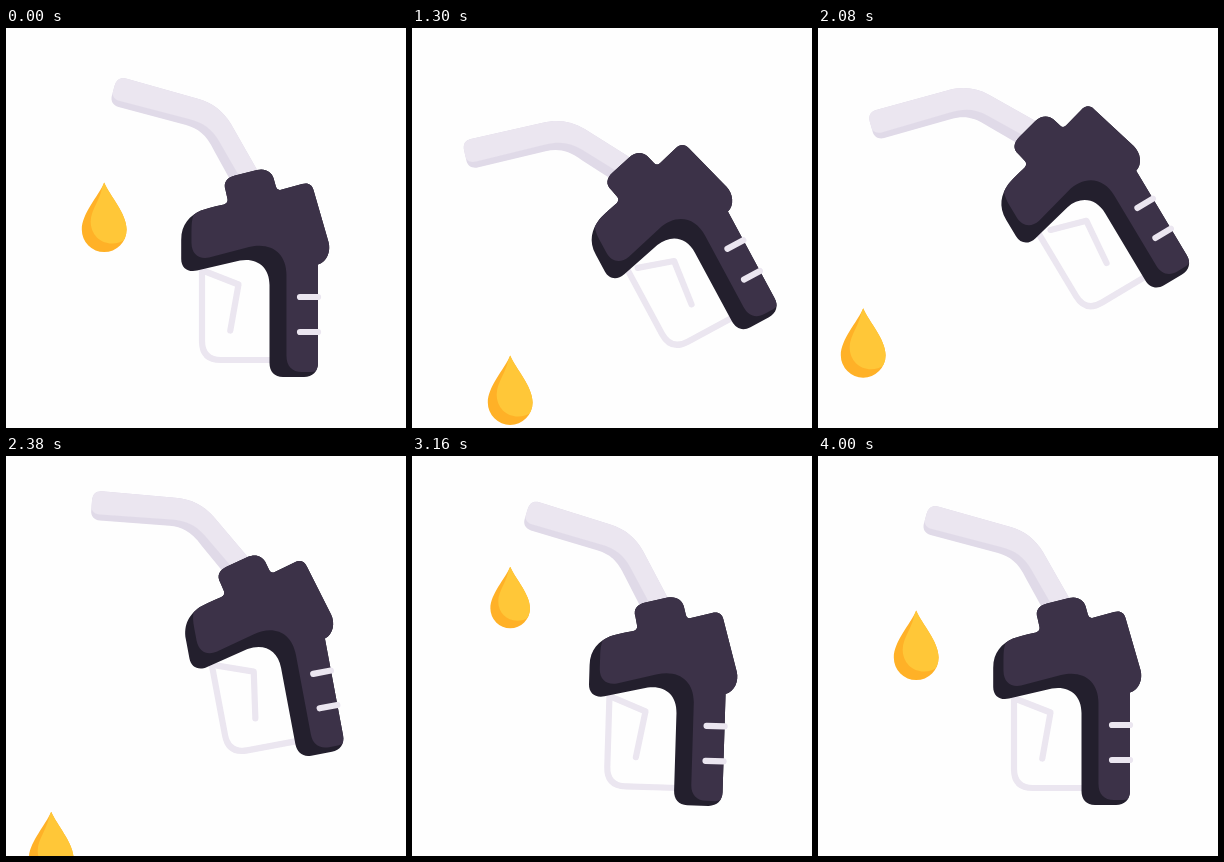
An HTML page for the animation above (4.03 s loop, 400x400 px).

```html
<!DOCTYPE html>
<html lang="en">
<head>
<meta charset="utf-8">
<title>Fuel nozzle</title>
<style>
  html, body { margin: 0; width: 100%; height: 100%; overflow: hidden; background: #fefefe; }
  svg { display: block; width: 100%; height: 100%; }
  .pale { fill: none; stroke: #ebe6f0; stroke-width: 6.2; stroke-linecap: round; stroke-linejoin: round; }
</style>
</head>
<body>
<svg viewBox="0 0 400 400">
  <defs>
    <path id="spout" d="M120 50.6 L191 70.5 C207 75 217 83 225 96 L254 147 L227 157 L208 122.5 C200 106 192 100.5 180 97 L112.500 79 C107 77.200 104.500 73 105.800 68 L108.500 58 C110.500 51.500 114 49.200 120 50.600 Z"/>
    <path id="body" d="M219.500 162 C217 154.500 221 149.500 229 147.500 L251 142 C259.500 140 265.500 144 267.500 150 L270 159 Q271.200 162.600 275 161.700 L296 156 C302 154.300 306 156.500 307.500 162 L322.500 214 C325 223 321 234 312 236.500 L312 335 C312 343.500 306.500 349 298 349 L277 349 C268.500 349 263.500 343.500 263.500 335 L263.500 257 C263.500 239 251 229.500 234 232.500 L191 242.600 C182 244.700 175.200 240 175.200 231 L175.200 212 C175.200 196 184 187.500 195 182.500 Q200 180.300 218 176.400 Q222.200 175 221.500 171 Z"/>
    <path id="drop" d="M0 0 C-6 14 -22.400 31 -22.400 47 A22.400 22.500 0 0 0 22.400 47 C22.400 31 6 14 0 0 Z"/>
    <clipPath id="spoutClip"><use href="#spout"/></clipPath>
    <clipPath id="bodyClip"><use href="#body"/></clipPath>
    <clipPath id="dropClip"><use href="#drop"/></clipPath>
  </defs>

  <g id="fuel">
    <use href="#drop" fill="#ffb127"/>
    <path clip-path="url(#dropClip)" fill="#ffc738" d="M-1 -2 C-2 16 -13.500 26 -13.500 39 C-13.500 52 -4 61 8 61 Q15 61 21 57 L40 40 L10 -5 Z"/>
  </g>

  <g id="nozzle">
    <use href="#spout" fill="#e0dae8"/>
    <path clip-path="url(#spoutClip)" fill="#ebe6f0" d="M106.500 62 C106 68 108 71.500 114 73 L183 91 C197 94.500 206 101 213 113 L240 160 L270 150 L220 50 L110 40 Z"/>
    <path class="pale" d="M196 240 V313 Q196 332 215 332 H268"/>
    <path id="trigger" class="pale" d="M198 243 L232.500 256.500 L224.300 302.500"/>
    <use href="#body" fill="#231f2d"/>
    <path clip-path="url(#bodyClip)" fill="#3c3248" d="M191 180 C186 188 185.500 194 185.500 203 V215 C185.500 226 193 231.500 203 229.500 L243 219 C265 213.500 280.500 225 280.500 247 V328 C280.500 338 286 344 296 344 H305 Q310 344 315 340 L345 240 L300 130 H200 Z"/>
    <path class="pale" d="M294 269 H312 M294 304 H312"/>
  </g>
</svg>
<script>
  const LOOP = 4030, HOLD = 1030, STEP = 30, END = 4000;
  const [nozzle, trigger, fuel] = ['nozzle', 'trigger', 'fuel'].map(id => document.getElementById(id));

  const progress = (t, from, to) => Math.min(1, Math.max(0, (t - from) / (to - from)));
  const ease = (t, from, to) => {
    const u = progress(t, from, to);
    return u * u * (3 - 2 * u);
  };

  // Eases from pose to pose, each given as [time, value].
  const poses = (...keys) => t => keys.slice(1).reduce(
    (value, [time, next], i) => value + (next - keys[i][1]) * ease(t, keys[i][0], time), keys[0][1]);

  const angle = poses([1010, 0], [1560, -52.3], [2830, 6.2], [3280, 0.8], [END, 0]);
  const shiftX = poses([1300, 0], [1780, 4], [2800, 1], [3350, 3.4], [END, 0]);
  const shiftY = poses([HOLD, 0], [1560, 8.8], [2240, -37.5], [2840, -2], [3550, -2], [END, 0]);
  const squeeze = poses([HOLD, 0], [1540, -6.8], [1750, -6.8], [2650, 0]);

  // Position of the drop's tip and its size, or nothing between drops.
  function dropAt(t) {
    if (t < 1400) {
      return { x: 98.2, y: 154.6 + 270 * progress(t, 1020, 1370) ** 2, size: 1 };
    }
    if (t < 2600) {
      const s = t - 1600;
      return { x: 36.2 + 9 * ease(t, 1420, 1640), y: 208 + 0.088 * s + 0.00013 * s * s, size: ease(t, 1420, 1550) };
    }
    return { x: 98.2, y: 154.6 - 75 * (1 - progress(t, 2900, END)) ** 2, size: ease(t, 2900, 3230) };
  }

  function draw(now) {
    const time = now % LOOP;
    const t = time < HOLD ? 0 : HOLD + Math.floor((time - HOLD) / STEP) * STEP;
    const { x, y, size } = dropAt(t);
    nozzle.setAttribute('transform',
      `translate(${shiftX(t)} ${shiftY(t)}) rotate(${angle(t)} 200 200)`);
    trigger.setAttribute('transform', `rotate(${squeeze(t)} 206 121)`);
    fuel.setAttribute('transform', `translate(${x} ${y}) scale(${size})`);
  }

  const start = performance.now();
  function tick() {
    draw(performance.now() - start);
    requestAnimationFrame(tick);
  }
  tick();
</script>
</body>
</html>
```
